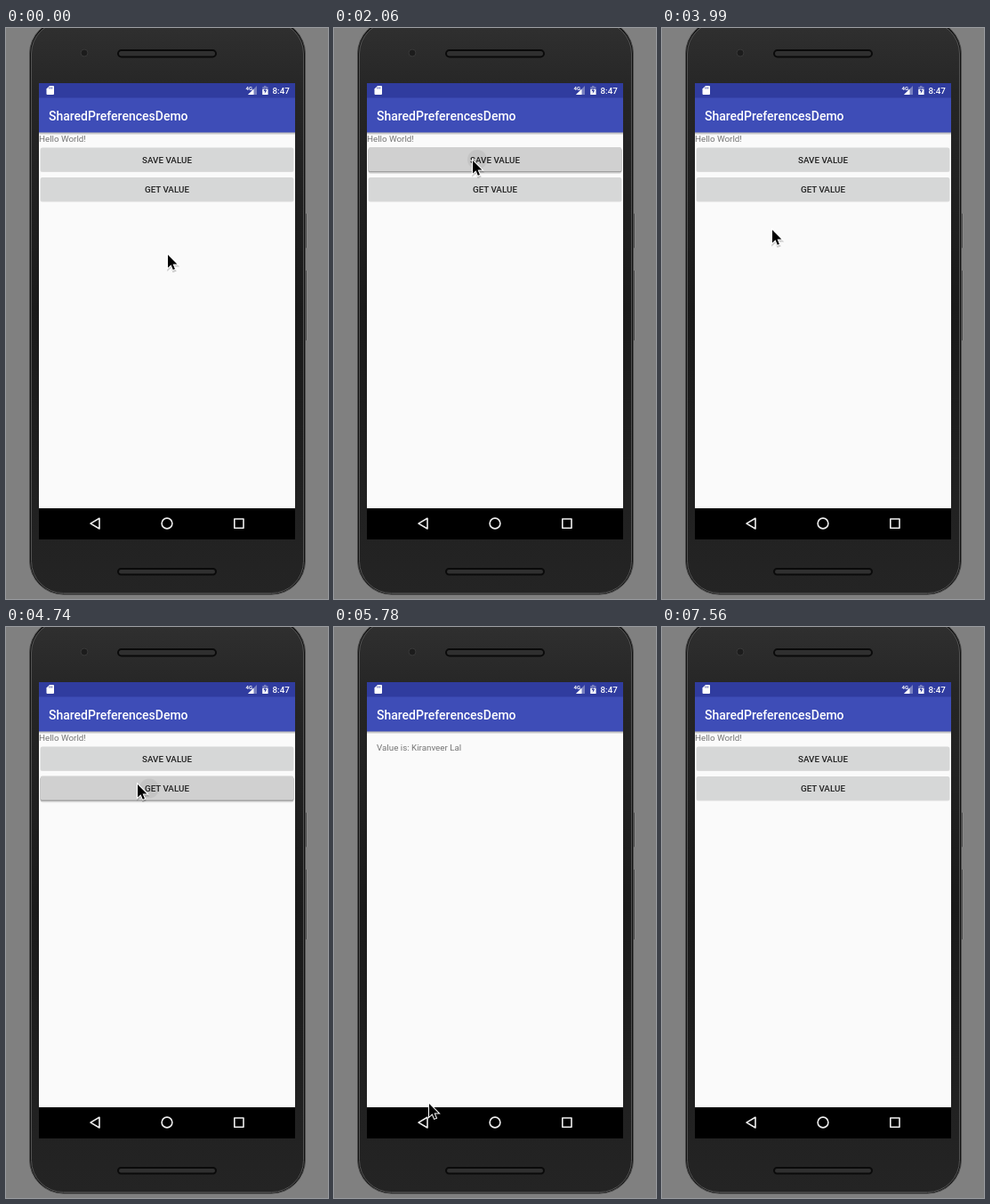
Recreate the animation shown at these times as an HTML page. Size 362 by 642 pixels, loop 8010 ms.

```html
<!DOCTYPE html>
<html lang="en">
<head>
<meta charset="utf-8">
<title>SharedPreferencesDemo</title>
<style>
html, body { margin: 0; width: 100%; height: 100%; overflow: hidden; background: #808080; }
svg { display: block; }
text { font: 9.8px Roboto, sans-serif; fill: #757575; }
.button { font-weight: 500; fill: #202020; text-anchor: middle; }
.title { font-size: 14px; font-weight: 500; fill: #fff; }
.clock { font-weight: 500; fill: #fff; }
</style>
</head>
<body>
<svg width="362" height="642" viewBox="0 0 362 642">
  <defs>
    <linearGradient id="body" x2="0" y2="1">
      <stop offset="0" stop-color="#303030"/>
      <stop offset=".12" stop-color="#262626"/>
      <stop offset=".5" stop-color="#1a1a1a"/>
      <stop offset="1" stop-color="#242424"/>
    </linearGradient>
    <linearGradient id="shade" x2="0" y2="1">
      <stop offset="0" stop-opacity=".3"/>
      <stop offset="1" stop-opacity="0"/>
    </linearGradient>
    <clipPath id="screen"><rect x="37" y="62" width="288" height="513"/></clipPath>
    <g id="window">
      <rect x="37" y="62" width="288" height="514"/>
      <rect x="37" y="62" width="288" height="478" fill="#fafafa"/>
      <rect x="37" y="62" width="288" height="17" fill="#303c9f"/>
      <rect x="37" y="78.5" width="288" height="39" fill="#3e4db7"/>
      <rect x="37" y="117.5" width="288" height="3" fill="url(#shade)"/>
      <text class="title" x="48" y="103.5">SharedPreferencesDemo</text>
    </g>
    <g id="key">
      <rect x="38.5" y="135" width="285" height="27" rx="2" fill="#000" opacity=".12"/>
      <rect x="39" y="134.5" width="284" height="26.5" rx="1.5" fill="#d6d7d7"/>
    </g>
    <g id="pressed">
      <rect x="38.5" y="135" width="285" height="29" rx="3" fill="#000" opacity=".1"/>
      <rect x="38.5" y="135" width="285" height="27.5" rx="2" fill="#000" opacity=".2"/>
      <rect x="39" y="134" width="284" height="27" rx="1.5" fill="#d0d0d0"/>
      <circle cx="161" cy="148" r="11" fill="#c4c4c4"/>
    </g>
  </defs>

  <!-- phone -->
  <g fill="#242424" stroke="#999" stroke-width=".7">
    <rect x="334" y="208" width="4" height="40" rx="1"/>
    <rect x="334" y="272" width="4" height="80" rx="1"/>
  </g>
  <rect x="26.5" y="-9" width="310" height="646" rx="38" fill="#111" stroke="#505050"/>
  <rect x="28.5" y="-7" width="306" height="642.5" rx="36" fill="url(#body)" stroke="#626262" stroke-width=".8"/>
  <g fill="#303030" stroke="#0a0a0a" stroke-width="2">
    <rect x="126" y="25" width="110" height="7.5" rx="3.7"/>
    <rect x="126" y="608" width="110" height="6.5" rx="3.2"/>
  </g>
  <circle cx="88" cy="28" r="4" fill="#1c1c1c" stroke="#383838"/>

  <!-- screen -->
  <g clip-path="url(#screen)">
    <rect x="37" y="62" width="288" height="514"/>
    <g id="home">
      <use href="#window"/>
      <text x="37" y="128">Hello World!</text>
      <use href="#key"/>
      <use href="#key" y="33.5"/>
      <use href="#pressed" id="save"/>
      <use href="#pressed" id="get" y="33.5"/>
      <text class="button" x="181" y="151.5">SAVE VALUE</text>
      <text class="button" x="181" y="185">GET VALUE</text>
    </g>
    <g id="page">
      <use href="#window"/>
      <text x="48" y="139">Value is: Kiranveer Lal</text>
    </g>
    <rect id="ripple" x="62" y="541.5" width="76" height="32.5" rx="16.2" fill="#202020"/>
    <g fill="none" stroke="#eee" stroke-width="1.6" stroke-linejoin="round">
      <path d="M105 551.3V563L95 557.1Z"/>
      <circle cx="181" cy="557" r="5.9"/>
      <path d="M256.8 552H267V562.2H256.8Z"/>
    </g>
    <g fill="#fff">
      <path d="M49 65H53Q54 65 54 66V74Q54 75 53 75H46.500Q45.500 75 45.500 74V68.500Z"/>
      <path d="M48.700 66.500V68.500M50.300 66.500V68.500M51.900 66.500V68.500" stroke="#303c9f" stroke-width=".7"/>
      <text x="269.500" y="70" style="font-size:6px;font-weight:700;fill:#fff">4G</text>
      <path d="M282 65V75H272Z" opacity=".35"/>
      <path d="M278.500 68.500V75H272Z"/>
      <path d="M288.300 66.300H290V65H292.500V66.300H294.500V75H288.300Z" opacity=".35"/>
      <path d="M288.300 69H294.500V75H288.300Z"/>
      <path d="M292 67L289.500 71H291.200L290.600 74L293.300 70H291.500Z" fill="#303c9f"/>
      <text class="clock" x="299.500" y="74">8:47</text>
    </g>
  </g>

  <g id="cursor">
    <path d="M0 1V17L3.700 13.500L6 19L8.700 18L6.300 12.800H11.500Z" opacity=".18" stroke="#000" stroke-width="1.500"/>
    <path d="M0 0V14.500L3.500 11.300L5.800 16.800L7.900 15.900L5.600 10.600H10.400Z" stroke="#fff" stroke-width="2" paint-order="stroke"/>
  </g>
</svg>

<script>
const LOOP = 8010, STEP = 148.1, SLIDE = 41;
const $ = id => document.getElementById(id);
const clamp = x => Math.min(1, Math.max(0, x));

// step, x, y of the pointer tip
const path = [
  [0, 182, 255], [1, 182, 256], [2, 182, 256], [3, 183, 255], [4, 184, 256], [5, 184, 256],
  [6, 188, 254], [8, 199, 230], [10, 176, 175], [12, 156, 149], [18, 156, 149],
  [21, 132, 568], [23, 106, 561], [25, 107, 555], [26, 113, 400], [27, 124, 227],
  [28, 135, 194], [30, 148, 177], [35, 148, 177], [39, 107, 536], [43, 107, 536],
  [48, 161, 202], [49, 210, 370], [50, 295, 617]
];
const visits = [{ open: 2340, close: 3580 }, { open: 4870, close: 6258 }];
const ripples = { 24: .6, 25: 1, 26: .5, 41: .6, 42: 1, 43: 1, 44: .4 };

function pointer(k) {
  const i = path.findIndex(p => p[0] >= k);
  if (i < 1) return path[0].slice(1);
  const [a, b] = [path[i - 1], path[i]];
  const f = (k - a[0]) / (b[0] - a[0]);
  return [a[1] + (b[1] - a[1]) * f, a[2] + (b[2] - a[2]) * f];
}

function pageState(t) {
  const visit = visits.find(v => t >= v.open && t < v.close + 250);
  if (!visit) return { alpha: 0, y: 0, dim: 1 };
  const out = t - visit.close, into = t - visit.open;
  if (out >= 0) return {
    alpha: 1 - clamp((out - 100) / 150),
    y: SLIDE * clamp(out / 250) ** 4,
    dim: .7 + .3 * clamp(out / 250)
  };
  return {
    alpha: 1 - (1 - clamp(into / 200)) ** 4,
    y: SLIDE * (1 - clamp(into / 350)) ** 5,
    dim: 1 - .3 * clamp(into / 217)
  };
}

function draw(ms) {
  const k = Math.floor(ms % LOOP / 148 + .12);
  const { alpha, y, dim } = pageState(k * STEP);
  $("home").setAttribute("opacity", dim);
  $("page").setAttribute("opacity", alpha);
  $("page").setAttribute("transform", `translate(0 ${y})`);
  $("save").setAttribute("opacity", +(k >= 14 && k < 18));
  $("get").setAttribute("opacity", +(k >= 32 && k < 35));
  $("ripple").setAttribute("opacity", ripples[k] || 0);
  $("cursor").setAttribute("opacity", +(k <= 50));
  if (k <= 50) $("cursor").setAttribute("transform", `translate(${pointer(k)})`);
}

const start = performance.now();
function tick() {
  draw(performance.now() - start);
  requestAnimationFrame(tick);
}
tick();
</script>
</body>
</html>
```
